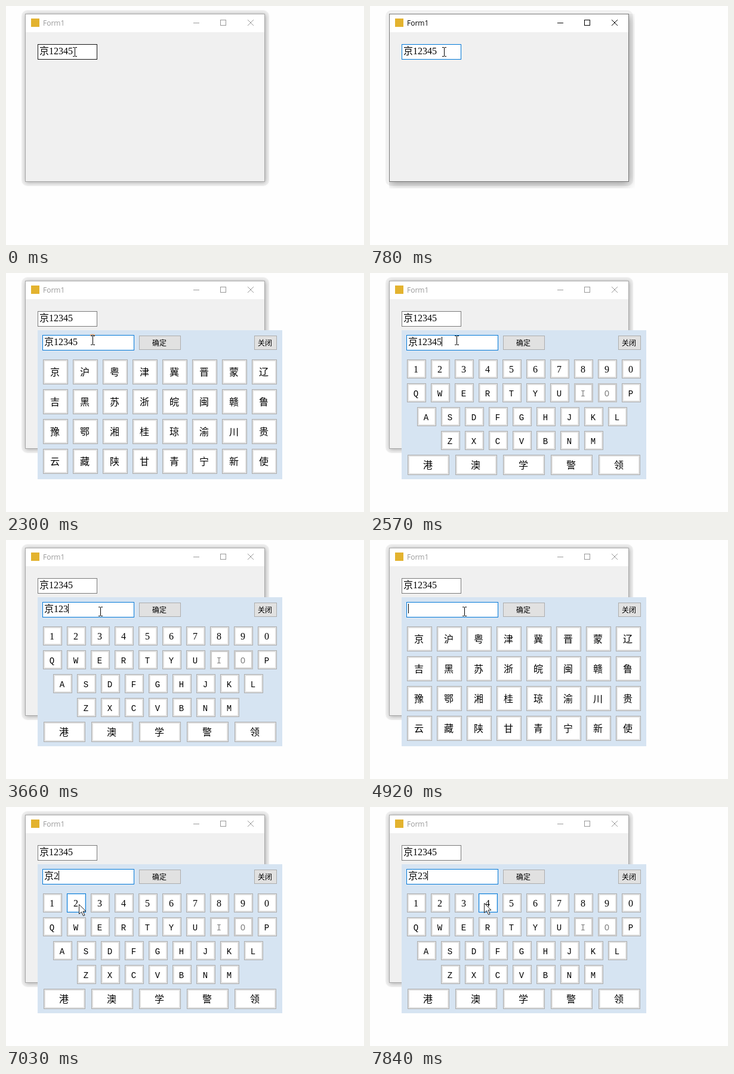
An HTML page with a canvas that plays this animation: 600x401 px, repeating every 7990 ms.

```html
<!DOCTYPE html>
<html lang="zh">
<head>
<meta charset="utf-8">
<style>
html, body { margin: 0; width: 600px; height: 401px; overflow: hidden; background: #fefefe; }
canvas { display: block; }
</style>
</head>
<body>
<canvas id="stage" width="600" height="401"></canvas>
<script>
const ctx = document.getElementById('stage').getContext('2d');
const LOOP = 7990, BLUE = '#0078d7', GREY = '#7a7a7a';
const SERIF = '300 16px "Liberation Serif", "Noto Sans CJK SC", "Noto Sans CJK", serif';
const MONO = '14px "Liberation Mono", monospace';
const SMALL = '12px "Noto Sans CJK SC", "Noto Sans CJK", sans-serif';

// Popup text: start time, content, caret visible, caret at start
const typing = [
  [1240, '京12345', true, true], [1770, '京12345'], [2420, '京12345', true],
  [2850, '京12345'], [3250, '京12345', true], [3510, '京1234', true],
  [3660, '京123', true], [3940, '京12', true], [4060, '京1', true],
  [4370, '京', true], [4800, '', true], [5350, ''], [6030, '京', true],
  [6560, '京'], [6900, '京2', true], [7570, '京23', true]
];
// Pointer moves: start, end, steps, target
const moves = [
  [120, 510, 3, 124, 77], [1240, 2180, 7, 145, 113], [3250, 3510, 2, 158, 120],
  [5070, 5790, 5, 82, 162], [6180, 6600, 3, 122, 163],
  [7030, 7300, 2, 160, 163], [7570, 7840, 2, 191, 161]
];
const presses = [[5910, 6030], [6760, 6900], [7435, 7570]];
const focusTimes = [1240, 6030, 6900, 7570];

const keyRow = (chars, x, y, w, h, step) =>
  [...chars].map((label, i) => ({ label, x: x + i * step, y, w, h }));
const provinces = ['京沪粤津冀晋蒙辽', '吉黑苏浙皖闽赣鲁', '豫鄂湘桂琼渝川贵', '云藏陕甘青宁新使']
  .flatMap((chars, r) => keyRow(chars, 62, 145 + r * 50, 42, 42, 50));
const letters = [
  ...keyRow('1234567890', 62, 145, 32, 32, 40), ...keyRow('QWERTYUIOP', 62, 185, 32, 32, 40),
  ...keyRow('ASDFGHJKL', 79, 225, 32, 32, 40), ...keyRow('ZXCVBNM', 119, 265, 32, 32, 40),
  ...keyRow('港澳学警领', 63, 305, 70, 34, 80)
];
const formBox = { x: 53, y: 64, w: 100, h: 26 };
const popupBox = { x: 61, y: 104, w: 154, h: 26 };

const inside = (p, r) => p.x >= r.x && p.x < r.x + r.w && p.y >= r.y && p.y < r.y + r.h;

function rect(color, x, y, w, h) {
  ctx.fillStyle = color;
  ctx.fillRect(x, y, w, h);
}

function frame({ x, y, w, h }, border, fill) {
  rect(border, x, y, w, h);
  rect(fill, x + 1, y + 1, w - 2, h - 2);
}

function text(str, x, y, font = SERIF, color = '#000', align = 'left') {
  ctx.font = font;
  ctx.fillStyle = color;
  ctx.textAlign = align;
  ctx.fillText(str, x, y);
}

function line(color, width, ...points) {
  ctx.beginPath();
  points.forEach(([x, y]) => ctx.lineTo(x, y));
  ctx.strokeStyle = color;
  ctx.lineWidth = width;
  ctx.stroke();
}

function pointerAt(t) {
  let x = 115, y = 77;
  for (const [start, end, steps, tx, ty] of moves) {
    if (t < start) break;
    const k = Math.min(1, Math.floor((t - start) / (end - start) * steps + 1e-6) / steps);
    x += (tx - x) * k;
    y += (ty - y) * k;
  }
  return { x: Math.round(x), y: Math.round(y) };
}

function drawWindow(active) {
  ctx.beginPath();
  ctx.roundRect(26, 7, 415, 295, 10);
  ctx.fillStyle = '#f0f0f0';
  ctx.fill();
  ctx.save();
  if (active) {
    ctx.beginPath();
    ctx.rect(32, 13, 412, 293);
    ctx.clip();
  }
  ctx.shadowColor = active ? 'rgba(0,0,0,.4)' : 'rgba(0,0,0,.32)';
  ctx.shadowBlur = active ? 14 : 7;
  ctx.shadowOffsetX = 1;
  ctx.shadowOffsetY = active ? 3 : 1;
  rect('#aaa', 32, 13, 402, 282);
  ctx.restore();
  rect(active ? '#777' : '#a8a8a8', 32, 13, 402, 282);
  rect('#fff', 33, 14, 400, 30);
  rect('#f0f0f0', 33, 44, 400, 250);
  rect('#e3b32f', 42, 21, 14, 14);
  const ink = active ? '#000' : '#999';
  text('Form1', 62, 33, '12px "Open Sans", sans-serif', ink);
  rect(ink, 314, 28, 10, 1);
  frame({ x: 359, y: 23, w: 10, h: 10 }, ink, '#fff');
  line(ink, 1, [405, 23], [415, 33]);
  line(ink, 1, [415, 23], [405, 33]);
}

function drawKey(key, hover, pressed) {
  const { label, x, y, w, h } = key;
  const disabled = label === 'I' || label === 'O';
  let border = '#adadad', ring = '#e1e1e1';
  if (disabled) [border, ring] = ['#bfbfbf', '#ccc'];
  else if (hover) [border, ring] = pressed ? ['#005499', '#cce4f7'] : [BLUE, '#e5f1fb'];
  frame(key, border, ring);
  rect('#fff', x + 3, y + 3, w - 6, h - 6);
  text(label, x + w / 2 - 1, y + h / 2 + 6, /[A-Z]/.test(label) ? MONO : SERIF,
    disabled ? '#838383' : '#000', 'center');
}

function drawPopup(t, pointer) {
  const [, content, caret, atStart] = typing.findLast(s => s[0] <= t);
  const pressed = presses.some(([a, b]) => t >= a && t < b);
  const fading = focusTimes.some(f => t >= f && t < f + 130);
  rect('#d6e4f2', 53, 96, 410, 250);
  frame(popupBox, pressed ? GREY : fading ? '#2c72ad' : BLUE, '#fff');
  text(content, 64, 121);
  if (caret) {
    const n = atStart ? 0 : content.length;
    rect('#000', 64 + (n && 8 + n * 8), 107, 1, 16);
  }
  frame({ x: 223, y: 105, w: 70, h: 24 }, '#adadad', '#e1e1e1');
  frame({ x: 416, y: 105, w: 38, h: 24 }, '#adadad', '#e1e1e1');
  text('确定', 257, 122, SMALL, '#000', 'center');
  text('关闭', 434, 122, SMALL, '#000', 'center');
  const showProvinces = t < 2420 || (t >= 4800 && t < 6030);
  for (const key of showProvinces ? provinces : letters) drawKey(key, inside(pointer, key), pressed);
}

function drawBeam({ x, y }) {
  for (const dy of [-8, 7]) {
    rect('#000', x - 3, y + dy, 3, 1);
    rect('#000', x + 1, y + dy, 3, 1);
  }
  rect('#000', x, y - 7, 1, 14);
}

function drawArrow({ x, y }) {
  ctx.save();
  ctx.translate(x + .5, y + .5);
  ctx.beginPath();
  for (const p of [[0, 0], [0, 16], [4, 12.5], [7, 19], [9.5, 18], [6.5, 11.5], [11.5, 11.5]]) ctx.lineTo(...p);
  ctx.closePath();
  ctx.fillStyle = '#fff';
  ctx.fill();
  ctx.strokeStyle = '#222';
  ctx.lineWidth = 1;
  ctx.stroke();
  ctx.restore();
}

function draw(t) {
  const pointer = pointerAt(t);
  const active = t >= 120 && t < 1240, open = t >= 1240;
  rect('#fefefe', 0, 0, 600, 401);
  drawWindow(active);
  frame(formBox, active ? BLUE : inside(pointer, formBox) ? '#171717' : GREY, '#fff');
  text('京12345', 56, 81);
  if (t >= 250 && t < 780) rect('#000', 112, 67, 1, 16);
  if (open) drawPopup(t, pointer);
  if (t >= 2300 && t < 2420) line('#f2a060', 1.5, [141, 104.5], [143, 103.5], [147, 103.5], [149, 104.5]);
  const busy = t >= 1240 && t < 1370;
  const overText = inside(pointer, formBox) || (open && inside(pointer, popupBox));
  (overText && !busy ? drawBeam : drawArrow)(pointer);
}

function tick() {
  draw(performance.now() % LOOP);
  requestAnimationFrame(tick);
}
tick();
</script>
</body>
</html>
```
